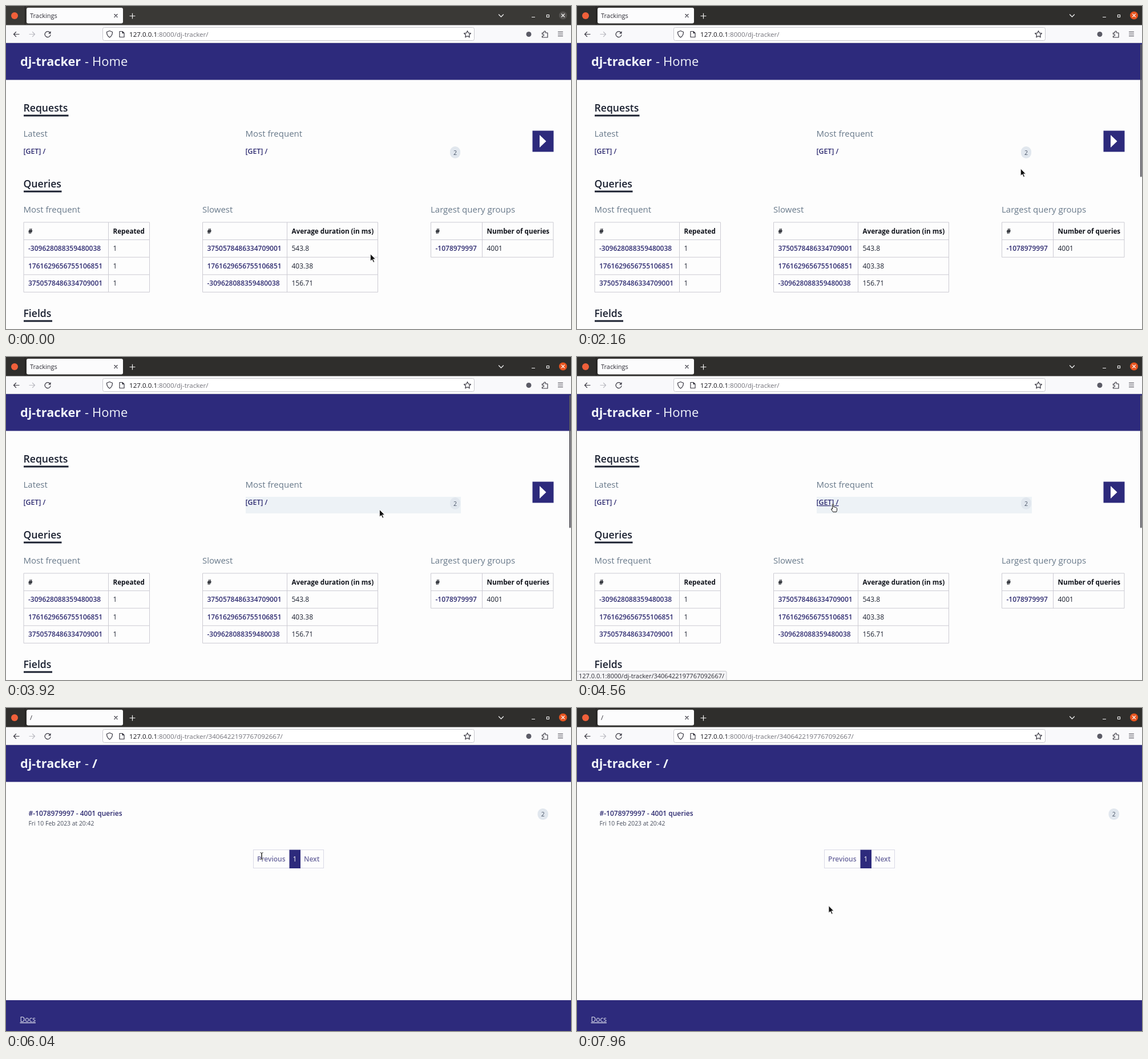
These frames come from a looping animation (990x566 px, 8000 ms). An HTML page:

```html
<!DOCTYPE html>
<html lang="en">
<head>
<meta charset="utf-8">
<title>Trackings</title>
<style>
  html, body { margin: 0; width: 100%; height: 100%; overflow: hidden; background: #fdfdfd; }
  svg { display: block; }
  text { font: 12px "Open Sans", "Noto Sans", sans-serif; fill: #1c2130; white-space: pre; }
  .ui { font-size: 11px; fill: #2b2a33; }
  .url { font-size: 11.6px; fill: #74747c; }
  .host { fill: #15141a; font-weight: 500; }
  .title { font-size: 22px; font-weight: 500; fill: #f1f5fb; }
  .title .b { font-size: 21.7px; font-weight: 700; }
  .h2 { font-size: 17.6px; font-weight: 600; fill: #1a2030; }
  .h3 { font-size: 15px; fill: #68798a; }
  .th { font-size: 11.7px; font-weight: 700; fill: #11141c; }
  .link { font-weight: 600; fill: #2d2a70; }
  .get { font-size: 12.3px; }
  .date { font-size: 10.4px; fill: #474d5c; }
  .num { font-size: 10.5px; fill: #4a5568; text-anchor: middle; }
  .page { font-weight: 600; fill: #6c699f; }
  .indigo { fill: #2d2a7c; }
  .badge { fill: #e1e7ee; }
  .rule { fill: #1a2030; }
  .grid { fill: none; stroke: #cccbd3; }
  .line { fill: none; stroke: #3a3943; stroke-width: 1.2; stroke-linecap: round; stroke-linejoin: round; }
  .light { stroke: #f4f4f4; }
  .faint { stroke: #bcbcc2; }
</style>
</head>
<body>
<svg width="990" height="566" viewBox="0 0 990 566">
  <rect width="990" height="566" fill="#fdfdfd"/>

  <!-- window bar -->
  <rect id="bar" width="990" height="34"/>
  <path d="M33.5 0V33" stroke="#1f1e1d"/>
  <circle cx="15" cy="17" r="6" fill="#f0603a"/>
  <rect x="36" y="3" width="169" height="27.500" rx="3" fill="#fcfcfd"/>
  <circle id="spinner" cy="17" r="2" fill="#8a7a5c"/>
  <text id="tab" class="ui" y="21"></text>
  <path class="line" d="M190 14.500l5 5m0-5l-5 5"/>
  <path class="line light" d="M217 17.500h9M221.500 13v9M863.500 15l4 4 4-4M921.500 19.500h5M947.500 15.500h4v4h-4z"/>
  <circle id="close" cx="976" cy="16.500" r="7"/>
  <path class="line light" d="M973.500 14l5 5m0-5l-5 5"/>

  <!-- toolbar -->
  <rect y="33.500" width="990" height="31.500" fill="#f9f9fb"/>
  <rect y="64" width="990" height="1" fill="#cfcfd4"/>
  <rect x="169.500" y="37.500" width="651" height="23" rx="3" fill="#fff" stroke="#c9c9ce"/>
  <path class="line" d="M23 49.500H13.500m4-4l-4 4 4 4"/>
  <path class="line faint" d="M41 49.500h9.500m-4-4l4 4-4 4"/>
  <g id="reload">
    <path class="line" d="M4 -3A5 5 0 1 0 5 1"/>
    <path d="M5.500 -5.500V-1H1z" fill="#3a3943"/>
  </g>
  <path class="line" d="M181.500 43.500l5 2c0 5-1.500 7.500-5 9.500-3.500-2-5-4.500-5-9.500z"/>
  <path class="line" d="M199 44.500h5l3 3v7h-8zM204 44.500v3h3"/>
  <path class="line" d="M808.500 43.500l1.800 3.800 4.200.500-3.100 2.900.800 4.100-3.700-2-3.700 2 .800-4.100-3.100-2.900 4.200-.500z"/>
  <circle cx="916" cy="49.500" r="4.500" fill="#5b5b66"/>
  <path class="line" d="M939.500 47h3v-1.500a1.500 1.500 0 0 1 3 0V47h3.500v8h-9.500v-2.500h1.500a1.500 1.500 0 0 0 0-3h-1.500z"/>
  <path class="line" d="M967.500 45.500h8m-8 3.500h8m-8 3.500h8"/>
  <text class="url" x="216" y="53.500"><tspan class="host">127.0.0.1</tspan><tspan id="path"></tspan></text>

  <!-- page header -->
  <rect class="indigo" y="65" width="990" height="64.500"/>
  <text class="title" y="105"><tspan class="b" x="25">dj-tracker</tspan><tspan x="138">-</tspan></text>

  <g id="home">
    <text class="title" x="151" y="105">Home</text>
    <text class="h2" x="30.500" y="185">Requests</text>
    <rect class="rule" x="31" y="190.500" width="78.500" height="3"/>
    <text class="h3" x="30.500" y="229">Latest</text>
    <text class="h3" x="419.500" y="229">Most frequent</text>
    <rect id="row" x="420" y="245" width="377" height="29" fill="#edf2f6"/>
    <text class="link get" x="30.500" y="259">[GET] /</text>
    <text id="get" class="link get" x="419.500" y="259">[GET] /</text>
    <rect class="badge" x="778" y="246" width="18" height="21" rx="9"/>
    <text class="num" x="787" y="260.500">2</text>
    <rect class="indigo" x="922.500" y="218.500" width="37" height="37"/>
    <path d="M935 226v22l11.500-11z" fill="#fff"/>

    <text class="h2" x="30.500" y="318">Queries</text>
    <rect class="rule" x="31" y="323.500" width="66.500" height="3"/>
    <text class="h3" x="30.500" y="362">Most frequent</text>
    <text class="h3" x="344" y="362">Slowest</text>
    <text class="h3" x="744" y="362">Largest query groups</text>
    <g id="tables"></g>

    <text class="h2" x="30.500" y="545">Fields</text>
    <rect class="rule" x="31" y="550.500" width="50" height="3"/>
    <rect id="scroll" x="987" y="67" width="2.500" height="232.500" rx="1" fill="#5a5960"/>
  </g>

  <g id="detail">
    <text class="title" x="151" y="105"><tspan class="b">/</tspan></text>
    <text class="link" x="39.500" y="188.500">#-1078979997 - 4001 queries</text>
    <text class="date" x="39.500" y="206">Fri 10 Feb 2023 at 20:42</text>
    <rect class="badge" x="931.500" y="176" width="18.500" height="20" rx="9"/>
    <text class="num" x="940.700" y="190">2</text>
    <rect x="433.500" y="248.500" width="123" height="32" fill="none" stroke="#d9d9e6"/>
    <rect class="indigo" x="496.500" y="248.500" width="19.500" height="32.500"/>
    <text class="page" x="440" y="269">Previous</text>
    <text x="502.500" y="269" style="fill:#fff">1</text>
    <text class="page" x="522" y="269">Next</text>
    <rect class="indigo" y="512" width="990" height="54"/>
    <text x="24.500" y="550" style="fill:#e9ecf5;text-decoration:underline">Docs</text>
  </g>

  <g id="status">
    <path id="statusBox" fill="#f4f4f6" stroke="#c4c4cb"/>
    <text id="statusText" class="ui" x="3" y="563"></text>
  </g>

  <g id="cursor">
    <path id="arrow" d="M0 0V12.500L3 10l2.200 4.800 2-.900L5 9.200h4z" fill="#111" stroke="#fff" stroke-width=".8"/>
    <g id="beam" fill="none">
      <path d="M-2.500 -5.500q2.500 0 2.500 1.500v9q0 1.500 -2.500 1.500M2.500 -5.500q-2.500 0 -2.500 1.500v9q0 1.500 2.500 1.500" stroke="#fff" stroke-width="2.500"/>
      <path d="M-2.500 -5.500q2.500 0 2.500 1.500v9q0 1.500 -2.500 1.500M2.500 -5.500q-2.500 0 -2.500 1.500v9q0 1.500 2.500 1.500" stroke="#222"/>
    </g>
    <path id="hand" d="M-.500 -1Q.500 -2.500 1.500 -1V4L3 3.600 4.500 4.600 6 4.600 7.500 6V9.500L6.500 12.500H.500L-2.500 8Q-2.500 6 -.500 7.500Z" fill="#fff" stroke="#111"/>
  </g>
</svg>
<script>
const $ = id => document.getElementById(id);
const show = (id, on) => $(id).setAttribute('display', on ? 'inline' : 'none');
const ROW = 30.6, TOP = 379;

function table(x, split, right, rows) {
  const bottom = TOP + ROW * rows.length;
  let lines = `M${split} ${TOP}V${bottom}`, cells = '';
  rows.forEach(([id, value], i) => {
    const y = TOP + ROW * i;
    if (i) lines += `M${x} ${y}H${right}`;
    cells += `<text class="${i ? 'link' : 'th'}" x="${x + 8}" y="${y + 19.5}">${id}</text>
      <text class="${i ? '' : 'th'}" x="${split + 8}" y="${y + 19.5}">${value}</text>`;
  });
  return `<path class="grid" d="M${x} ${TOP}H${right}V${bottom}H${x}Z${lines}"/>${cells}`;
}

const [a, b, c] = ['-309628088359480038', '1761629656755106851', '3750578486334709001'];
$('tables').innerHTML =
  table(31, 179.5, 251.5, [['#', 'Repeated'], [a, 1], [b, 1], [c, 1]]) +
  table(344.5, 492.5, 651.5, [['#', 'Average duration (in ms)'], [c, 543.8], [b, 403.38], [a, 156.71]]) +
  table(744.5, 834.5, 959, [['#', 'Number of queries'], ['-1078979997', 4001]]);

// pointer waypoints: time, x, y
const path = [
  [0, 638.5, 434.5], [840, 638.5, 434.5], [920, 639, 437], [1200, 729.5, 350],
  [1480, 729.5, 350], [1640, 765, 363], [1880, 888, 270],
  [2000, 888, 270], [2280, 695.5, 296],
  [3320, 695.5, 296], [4120, 641, 258], [4520, 448, 259],
  [6360, 448, 259], [6640, 446, 312], [6920, 484, 290], [7200, 487, 256],
  [7480, 480, 285], [7760, 432, 340], [7920, 441, 346.5], [8000, 441, 346.5]
];

function pointer(t) {
  const i = path.findIndex(p => p[0] > t);
  const [t0, x0, y0] = path[i - 1], [t1, x1, y1] = path[i];
  const k = (t - t0) / (t1 - t0);
  return [x0 + (x1 - x0) * k, y0 + (y1 - y0) * k];
}

const HOME = ':8000/dj-tracker/', DETAIL = HOME + '3406422197767092667/';

function draw(t) {
  const [x, y] = pointer(t);
  const focused = t >= 80, home = t < 5560, loading = !home && t < 5880;
  const onRow = home && x > 420 && x < 797 && y > 245 && y < 274;
  const onLink = onRow && x < 459;
  const onText = !home && x > 438 && x < 491 && y > 255 && y < 275;

  show('home', home);
  show('detail', !home);
  show('row', onRow);
  show('spinner', loading);
  show('status', onLink || loading);
  show('arrow', !onLink && !onText);
  show('beam', onText);
  show('hand', onLink);

  $('cursor').setAttribute('transform', `translate(${x} ${y})`);
  $('bar').setAttribute('fill', focused ? '#2f2e2c' : '#3a3936');
  $('close').setAttribute('fill', focused ? '#e8541f' : '#555351');
  $('scroll').setAttribute('opacity', Math.min(1, Math.max(0, (t - 860) / 120)));
  $('get').setAttribute('text-decoration', onLink ? 'underline' : 'none');
  $('tab').textContent = home ? 'Trackings' : '/';
  $('tab').setAttribute('x', loading ? 58.5 : 42);
  $('spinner').setAttribute('cx', 47 + 4 * Math.sin((t - 5680) / 120));
  $('reload').setAttribute('transform', `translate(73 49.5) scale(${loading ? -1 : 1} 1)`);
  $('path').textContent = home ? HOME : DETAIL;
  $('statusText').textContent = '127.0.0.1' + (home ? DETAIL : '');
  $('statusBox').setAttribute('d', `M-1 550.5H${home ? 260 : 50}q2 0 2 2V567H-1Z`);
}

const start = performance.now();
(function tick() {
  draw((performance.now() - start) % 8000);
  requestAnimationFrame(tick);
})();
</script>
</body>
</html>
```
